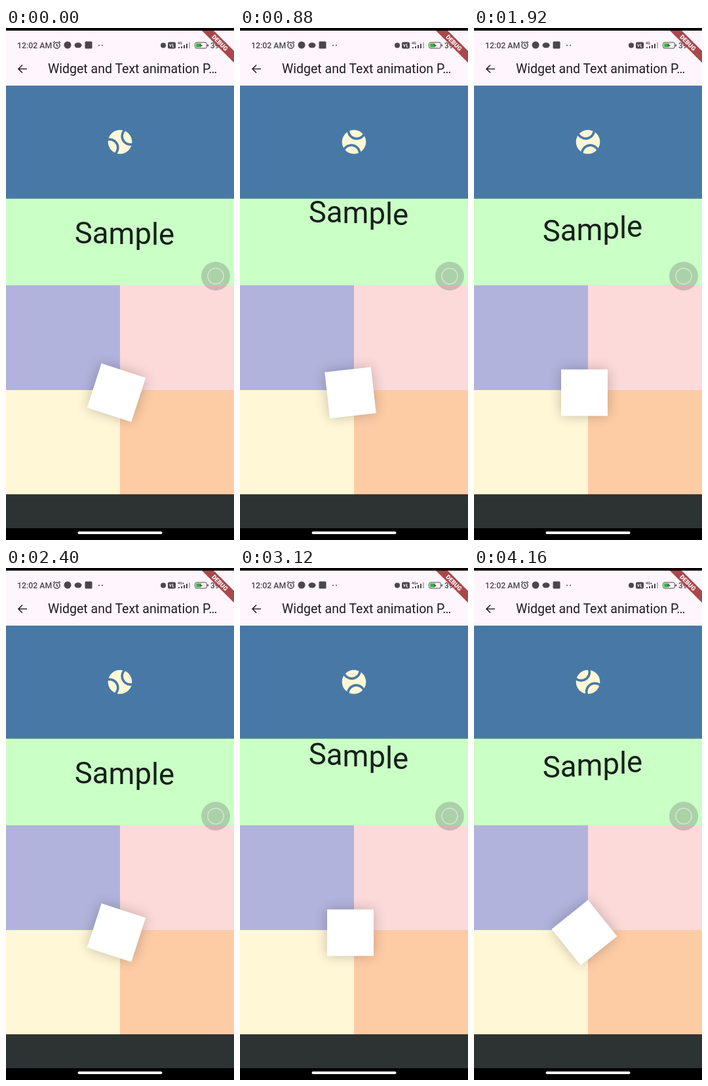
Animation of 348 by 782 pixels, one loop 4.24 s. Source, as an HTML page:

```html
<!DOCTYPE html>
<html lang="en">
<head>
<meta charset="utf-8">
<title>Widget and text animation</title>
<style>
  html, body { margin: 0; width: 100%; height: 100%; overflow: hidden; background: #000; }
  svg { display: block; width: 348px; height: 782px; font-family: Roboto, Arial, sans-serif; }
</style>
</head>
<body>
<svg viewBox="0 0 348 782">
  <defs>
    <filter id="blur" x="-60%" y="-60%" width="220%" height="220%">
      <feGaussianBlur stdDeviation="10"/>
    </filter>
    <clipPath id="screen"><rect y="4" width="348" height="778"/></clipPath>
  </defs>

  <!-- panels -->
  <rect width="348" height="782" fill="#000"/>
  <rect y="4" width="348" height="84" fill="#fff5fc"/>
  <rect y="88" width="348" height="172.5" fill="#4879a6"/>
  <rect y="260.5" width="348" height="132.5" fill="#caffc6"/>
  <rect y="393" width="174" height="160" fill="#b2b3dc"/>
  <rect x="174" y="393" width="174" height="160" fill="#fddada"/>
  <rect y="553" width="174" height="159.5" fill="#fff7d6"/>
  <rect x="174" y="553" width="174" height="159.5" fill="#fdcca5"/>
  <rect y="712.5" width="348" height="51.5" fill="#2d3233"/>
  <rect x="109.5" y="769" width="129" height="4" rx="2" fill="#fff"/>

  <!-- status bar -->
  <g fill="#4a464b">
    <text x="17" y="31" font-size="12.3" font-weight="500">12:02 AM</text>
    <g fill="none" stroke="#4a464b" stroke-width="1.5">
      <circle cx="77.5" cy="26.5" r="4.6"/>
      <path d="M77.5 24v3l2 1M72 22.500l2.500-2M83 22.500l-2.500-2"/>
    </g>
    <circle cx="94" cy="26" r="5.5"/>
    <ellipse cx="110" cy="26.300" rx="5.500" ry="4"/>
    <rect x="120.500" y="20.500" width="11" height="11" rx="1.500"/>
    <circle cx="142" cy="26.500" r="1"/>
    <circle cx="147" cy="26.500" r="1"/>
    <circle cx="240" cy="26.500" r="4"/>
    <rect x="247" y="21.500" width="12" height="10" rx="2.500"/>
    <path d="M249.500 24.500l1.500 4 1.500-4M254.500 24v5h2" stroke="#fff5fc" fill="none"/>
    <text id="net" x="262" y="25" font-size="5.500" font-weight="700">4G</text>
    <path d="M263 29h2v2h-2zM267 28h2v3h-2zM271 26h2v5h-2zM275 24h2v7h-2z"/>
    <path d="M279 22h2v9h-2z" opacity=".4"/>
    <rect x="288.500" y="22" width="18" height="9" rx="2.500" fill="none" stroke="#4a464b"/>
    <rect x="290" y="23.500" width="7" height="6" rx="1" fill="#35b540"/>
    <path d="M298 23l-3 4h2.500l-1 3 3.500-4h-2.500z"/>
    <rect x="307.500" y="25" width="1.500" height="3"/>
    <text x="312" y="31" font-size="12" font-weight="500">39</text>
  </g>

  <!-- app bar -->
  <path d="M32 62.500H19.500M25 56.500l-6 6 6 6" fill="none" stroke="#29252a" stroke-width="1.700"/>
  <text x="64" y="69" font-size="19.500" fill="#1f1b20">Widget and Text animation P…</text>

  <!-- corner ribbon -->
  <g clip-path="url(#screen)">
    <path d="M295 0L348 53V35L313 0z" fill="#a9474b"/>
    <text transform="translate(326.500 22.500) rotate(45)" y="3.400" font-size="9.400" font-weight="900"
      text-anchor="middle" fill="#fff">DEBUG</text>
  </g>

  <!-- ball -->
  <g id="ball" fill="#fff7d6">
    <path d="M-8.190-5.720C-9.330-4.100-10-2.130-10 0s.670 4.100 1.810 5.720C-5.770 4.950-4 2.680-4 0s-1.770-4.950-4.190-5.720z"/>
    <path d="M8.190-5.720C5.770-4.950 4-2.680 4 0s1.770 4.950 4.190 5.720C9.330 4.100 10 2.130 10 0s-.670-4.100-1.810-5.720z"/>
    <path d="M2 0c0-3.280 1.970-6.090 4.790-7.330C5.010-8.980 2.630-10 0-10s-5.010 1.020-6.790 2.670C-3.970-6.090-2-3.280-2 0s-1.970 6.090-4.790 7.330C-5.010 8.980-2.630 10 0 10s5.010-1.020 6.790-2.670C3.970 6.090 2 3.280 2 0z"/>
  </g>

  <g id="word" font-size="45.500" fill="#16201a"></g>

  <!-- spinning box -->
  <g transform="translate(168.500 557)">
    <rect class="box" x="-35.500" y="-35.500" width="71" height="71" opacity=".23" filter="url(#blur)"/>
    <rect class="box" x="-35.500" y="-35.500" width="71" height="71" fill="#fff"/>
  </g>

  <!-- touch marker -->
  <circle cx="320" cy="379" r="22" fill="#555" fill-opacity=".27"/>
  <circle cx="320" cy="379" r="12" fill="none" stroke="#fff" stroke-opacity=".5" stroke-width="1.400"/>
</svg>
<script>
const LOOP = 4240, STEP = 80, TURN = 2400, SPIN = 1200;

const ball = document.getElementById('ball');
const net = document.getElementById('net');
const boxes = document.querySelectorAll('.box');

// Letters sit at their natural advance (in em) and move on their own.
const advance = [0.593, 0.544, 0.876, 0.561, 0.243, 0.53];
let left = 104.8;
const letters = [...'Sample'].map((ch, i) => {
  const el = document.createElementNS('http://www.w3.org/2000/svg', 'text');
  el.textContent = ch;
  el.setAttribute('x', left);
  document.getElementById('word').append(el);
  left += advance[i] * 45.5;
  return el;
});

// Half a turn of the box: [ms, degrees]
const keys = [[0, 18], [160, 37.4], [320, 43.9], [560, 51.3], [720, 90], [880, 173.5], [1200, 198]];
const last = keys.length - 1;
const rate = i => (keys[i + 1][1] - keys[i][1]) / (keys[i + 1][0] - keys[i][0]);
const slope = i => {
  const a = rate((i + last - 1) % last), b = rate(i % last);
  return 2 * a * b / (a + b);
};

function boxAngle(t) {
  const p = t % SPIN;
  let i = 0;
  while (p >= keys[i + 1][0]) i++;
  const [t0, a] = keys[i], [t1, b] = keys[i + 1];
  const d = t1 - t0, s = (p - t0) / d, r = 1 - s;
  return a * r * r * (1 + 2 * s) + b * s * s * (3 - 2 * s)
    + d * s * r * (slope(i) * r - slope(i + 1) * s) + 180 * Math.floor(t / SPIN);
}

function draw(t) {
  const phase = (t - 1000) / TURN * 2 * Math.PI;
  ball.setAttribute('transform', `translate(174 174) rotate(${t / TURN * 360 - 29}) scale(1.83)`);
  letters.forEach((el, i) => el.setAttribute('y', 313.3 - 17.6 * Math.cos(phase - i * 0.1)));
  boxes.forEach(el => el.setAttribute('transform', `rotate(${boxAngle(t)})`));
  net.textContent = t < 2000 ? '4G' : '4G+';
}

const start = performance.now();
function tick() {
  const t = (performance.now() - start) % LOOP;
  draw(Math.floor(t / STEP) * STEP);
  requestAnimationFrame(tick);
}
tick();
</script>
</body>
</html>
```
